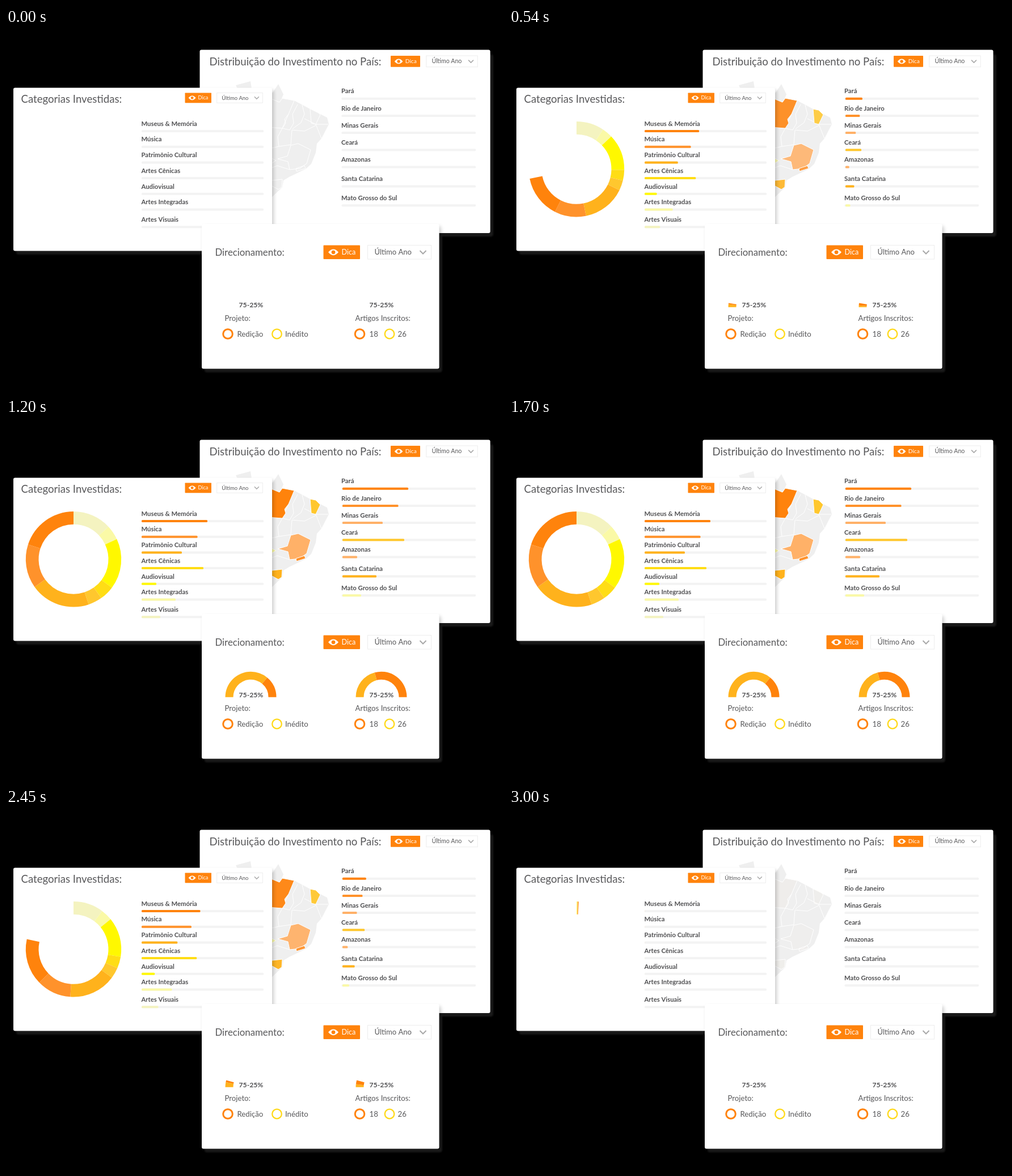
Write an HTML page with a canvas that moves like this. It is 876 by 639 pixels and loops after 3040 ms.

```html
<!DOCTYPE html>
<html lang="pt-BR">
<head>
<meta charset="utf-8">
<title>Painel de investimentos</title>
<style>
html, body { margin: 0; width: 100%; height: 100%; overflow: hidden; background: #000; }
canvas { display: block; width: 876px; height: 639px; }
</style>
</head>
<body>
<canvas id="stage" width="876" height="639"></canvas>
<script>
const ctx = document.getElementById('stage').getContext('2d');
const LOOP = 3040, FPS = 24, FRAMES = 73;
const ORANGE = '#ff830c', TANGERINE = '#ff922b', AMBER = '#ffb21c', GOLD = '#ffc72e';
const LEMON = '#ffdd15', YELLOW = '#fff800', PALE = '#faf9a6', CREAM = '#f4f3c0';
const PEACH = '#ffb168', SUN = '#ffd91a', INK = '#58585a', DARK = '#505052';

const clamp = x => Math.min(1, Math.max(0, x));
const smooth = x => x * x * (3 - 2 * x);
const cubic = x => x < .5 ? 4 * x ** 3 : 1 - 4 * (1 - x) ** 3;
const phase = (n, start, length) => clamp((n - start) / length);

// Both lists rank the same values
const values = [116, 98.5, 71, 109, 26, 60, 33];
const categories = {
  x: 239, inset: 0, end: 454, top: 182, pitch: 27.7, looseFrom: 5, slack: 3,
  labels: ['Museus & Memória', 'Música', 'Patrimônio Cultural', 'Artes Cênicas',
    'Audiovisual', 'Artes Integradas', 'Artes Visuais'],
  colors: [ORANGE, TANGERINE, AMBER, LEMON, YELLOW, PALE, CREAM]
};
const states = {
  x: 591.5, inset: 1.5, end: 828, top: 124.7, pitch: 30.2, looseFrom: 4, slack: 3.7,
  labels: ['Pará', 'Rio de Janeiro', 'Minas Gerais', 'Ceará', 'Amazonas',
    'Santa Catarina', 'Mato Grosso do Sul'],
  colors: [ORANGE, TANGERINE, PEACH, GOLD, PEACH, AMBER, PALE]
};
const donut = [
  [47, CREAM], [65, PALE], [126.5, YELLOW], [144.5, LEMON],
  [161.5, GOLD], [234.5, AMBER], [288, TANGERINE], [360, ORANGE]
];

// The coast, then the state lines
const land = new Path2D('M460 112 L470 114 480 99 489 117 486 124 508 128 536 143 554 152 566 158 569 170 ' +
  '556 195 548 204 546 220 538 240 528 249 499 263 489 269 487 281 466 301Z M405 101 L431 94 433 107 408 107Z');
const borders = new Path2D('M498 152 L487 177 479 192 481 209 460 214 M487 177 L500 180 507 168 505 152 514 135 ' +
  'M505 178 L520 167 526 152 522 136 M526 160 L546 170 568 170 M546 172 L526 182 504 180 502 206 481 209 ' +
  'M546 170 L556 195 M500 250 L478 243 460 250');
const regions = [
  ['M460 122 L482 131 487 124 508 128 498 152 491 161 493 168 487 177 460 175Z', ORANGE],
  ['M536 143 L546 145 554 153 546 170 538 168Z', GOLD],
  ['M479 231 L496 226 502 207 515 204 537 215 530 239 518 248 500 250 497 236Z', PEACH],
  ['M511 248 L526 243 528 248 512 253Z', TANGERINE],
  ['M460 226 L476 234 460 244Z', PALE],
  ['M460 270 L487 267 486 281 480 285 460 274Z', AMBER]
].map(([d, color]) => [new Path2D(d), color]);

function box(x, y, w, h, r, fill) {
  ctx.fillStyle = fill;
  ctx.beginPath();
  ctx.roundRect(x, y, w, h, r);
  ctx.fill();
}

function dot(x, y, r) {
  ctx.beginPath();
  ctx.arc(x, y, r, 0, 2 * Math.PI);
}

function text(str, x, y, size, color = INK, weight = 400) {
  ctx.font = `${weight} ${size}px Lato, sans-serif`;
  ctx.fillStyle = color;
  ctx.fillText(str, x, y);
}

function glow([x, y, w, h]) {
  ctx.save();
  ctx.filter = 'blur(1.5px)';
  box(x + 5, y + 8, w, h - 2, 4, '#1e1e1e');
  ctx.restore();
}

function panel([x, y, w, h]) {
  ctx.save();
  ctx.shadowColor = 'rgba(0,0,0,.2)';
  ctx.shadowBlur = 6;
  ctx.shadowOffsetX = 3;
  ctx.shadowOffsetY = 4;
  box(x, y, w, h, 3, '#fff');
  ctx.restore();
}

// Tip button and period select, one component at three scales
function toolbar(x, y, scale) {
  ctx.save();
  ctx.translate(x, y);
  ctx.scale(scale, scale);
  box(0, 0, 64.5, 24.5, 1, ORANGE);
  ctx.fillStyle = '#fff';
  ctx.beginPath();
  ctx.moveTo(8.5, 12.3);
  ctx.quadraticCurveTo(17.5, 1.5, 26.5, 12.3);
  ctx.quadraticCurveTo(17.5, 23.1, 8.5, 12.3);
  ctx.fill();
  ctx.fillStyle = ORANGE;
  dot(17.5, 12.3, 3.4);
  ctx.fill();
  text('Dica', 32, 16.4, 12.6, '#fff');
  ctx.strokeStyle = '#ededed';
  ctx.lineWidth = 1 / scale;
  ctx.strokeRect(78, 0, 112, 24.5);
  text('Último Ano', 90, 16.7, 13);
  ctx.strokeStyle = '#a8a8a8';
  ctx.lineWidth = 2;
  ctx.beginPath();
  ctx.moveTo(170, 9.5);
  ctx.lineTo(175.5, 15);
  ctx.lineTo(181, 9.5);
  ctx.stroke();
  ctx.restore();
}

function bars(list, p) {
  const { x, inset, end, top, pitch, looseFrom, slack } = list;
  list.labels.forEach((label, i) => {
    const y = top + pitch * i + slack * Math.max(0, i - looseFrom);
    const w = values[i] * p;
    text(label, x - .5, y - 9.3, 11.3, DARK, 700);
    box(x, y - 2, end - x, 4, 1.5, '#f3f3f3');
    if (w > 0) box(x + inset, y - 2, w, 4, Math.min(1.5, w / 2), list.colors[i]);
  });
}

// Part ends in degrees, clockwise from "from"
function arcs(x, y, outer, inner, from, parts, p) {
  const angle = deg => (from + deg * p) * Math.PI / 180;
  let last = 0;
  for (const [end, color] of p > 0 ? parts : []) {
    ctx.fillStyle = color;
    ctx.beginPath();
    ctx.arc(x, y, outer, angle(last), angle(end));
    ctx.arc(x, y, inner, angle(end), angle(last), true);
    ctx.fill();
    last = end;
  }
}

function legend(x, textX, label, color, width) {
  ctx.strokeStyle = color;
  ctx.lineWidth = width;
  dot(x, 540, 8.3);
  ctx.stroke();
  text(label, textX, 544.5, 13.2);
}

function gauge(x, title, split, p) {
  arcs(x + 46, 492.7, 45, 31, 180, [[split, AMBER], [180, ORANGE]], p);
  text('75-25%', x + 25, 492.5, 12.2, DARK, 700);
  text(title, x, 516.5, 13.2);
}

function map(alpha) {
  ctx.fillStyle = '#efefef';
  ctx.fill(land);
  ctx.strokeStyle = '#fff';
  ctx.lineWidth = 1;
  ctx.stroke(borders);
  for (const [path, color] of regions) {
    ctx.globalAlpha = alpha;
    ctx.fillStyle = color;
    ctx.fill(path);
    ctx.globalAlpha = 1;
    ctx.stroke(path);
  }
}

function country(n) {
  text('Distribuição do Investimento no País:', 358.5, 65.5, 18.6);
  toolbar(678, 49, .806);
  map(phase(n, .8, 14));
  bars(states, cubic(phase(n, 4.5, 21.2)));
}

function investment(n) {
  text('Categorias Investidas:', 26.5, 132, 18.6);
  toolbar(315.5, 114.5, .72);
  arcs(119, 249.3, 84.2, 61.5, -90, donut, smooth(phase(n, 0, 20)));
  bars(categories, cubic(phase(n, 0, 20)));
}

function direction(n) {
  const p = cubic(phase(n, 8, 21.5));
  text('Direcionamento:', 368.5, 402, 16.8);
  toolbar(559.5, 383.5, 1);
  gauge(385.5, 'Projeto:', 130, p);
  gauge(615.5, 'Artigos Inscritos:', 75, p);
  legend(391, 407.5, 'Redição', ORANGE, 3);
  legend(477.5, 492, 'Inédito', SUN, 2.3);
  legend(623.5, 640.5, '18', ORANGE, 3);
  legend(676, 690.5, '26', SUN, 2.3);
}

const cards = [
  { area: [341.5, 38.5, 512, 323.5], paint: country },
  { area: [13, 105.5, 456, 288], paint: investment },
  { area: [345, 346, 418.5, 255.5], paint: direction }
];

// Runs forward for half the loop, then back
function draw(time) {
  const frame = Math.floor((time % LOOP + 9) * FPS / 1000);
  const n = Math.min(frame, FRAMES - frame);
  ctx.fillStyle = '#000';
  ctx.fillRect(0, 0, 876, 639);
  for (const { area } of cards) glow(area);
  for (const { area, paint } of cards) {
    panel(area);
    paint(n);
  }
}

const start = performance.now();
function tick() {
  draw(performance.now() - start);
  requestAnimationFrame(tick);
}
tick();
</script>
</body>
</html>
```
